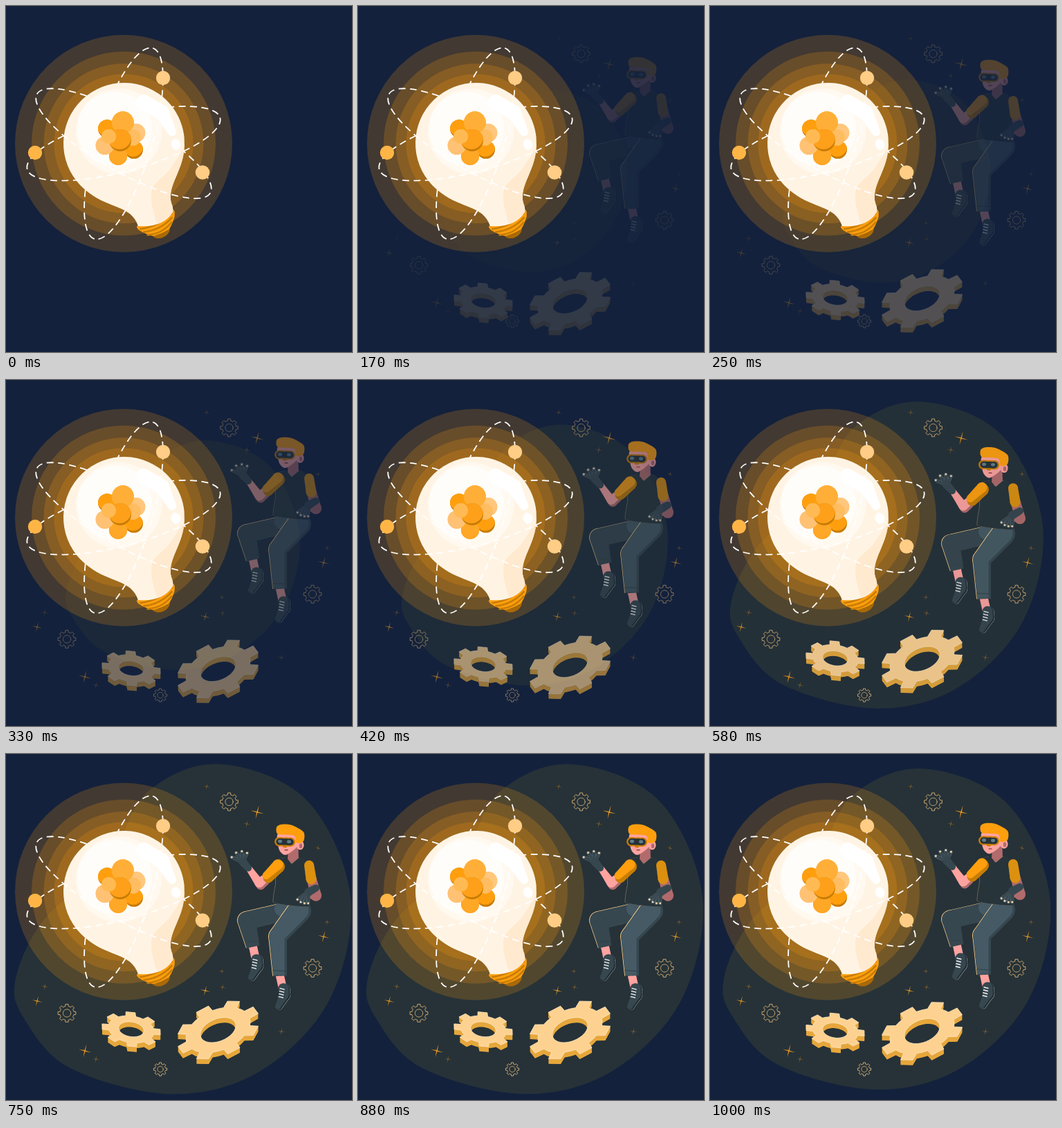
An HTML page with a canvas for the animation above (1.04 s loop, 500 px wide and 500 px high).

```html
<!DOCTYPE html>
<html lang="en">
<head>
<meta charset="utf-8">
<title>Bright idea</title>
<style>
html, body { margin: 0; width: 100%; height: 100%; overflow: hidden; background: #13213c; }
canvas { display: block; width: 100vw; height: 100vh; }
</style>
</head>
<body>
<canvas id="stage" width="500" height="500"></canvas>
<script>
const LOOP = 1040, RUN = 1000, LEAD = 20, TAU = Math.PI * 2, DEG = TAU / 360;
const ORANGE = '#ff9f0e', DULL = '#dc900f', AMBER = '#c97d04', CREAM = '#ffd08a', INK = '#263238';
const SKIN = '#ffa3a0', SKIN_DARK = '#b16b6c', GLOVE = '#37474f', EDGE = '#64747d';
const JEANS = '#455a64', JEANS_DARK = '#37474f';

const main = document.getElementById('stage').getContext('2d');
const sheet = document.createElement('canvas');
sheet.width = sheet.height = 500;
const layer = sheet.getContext('2d');
let c = main;

// cubic-bezier(.36, -.01, .5, 1.38)
function ease(x) {
  const at = (u, a, b) => 3 * a * u * (1 - u) ** 2 + 3 * b * u * u * (1 - u) + u ** 3;
  let lo = 0, hi = 1;
  for (let i = 0; i < 24; i++) {
    const mid = (lo + hi) / 2;
    if (at(mid, .36, .5) < x) lo = mid; else hi = mid;
  }
  return at(lo, -.01, 1.38);
}

// Closed curve through points; k = 0 gives straight sides, k = 1 a smooth curve.
function shape(fill, p, k = .8) {
  const n = p.length, get = i => p[(i + n) % n];
  c.beginPath();
  c.moveTo(...p[0]);
  for (let i = 0; i < n; i++) {
    const [a, b, d, e] = [i - 1, i, i + 1, i + 2].map(get), s = k / 6;
    c.bezierCurveTo(b[0] + (d[0] - a[0]) * s, b[1] + (d[1] - a[1]) * s,
      d[0] - (e[0] - b[0]) * s, d[1] - (e[1] - b[1]) * s, ...d);
  }
  c.fillStyle = fill;
  c.fill();
}

function disc(fill, x, y, rx, ry = rx, turn = 0) {
  c.beginPath();
  c.ellipse(x, y, rx, ry, turn, 0, TAU);
  c.fillStyle = fill;
  c.fill();
}

// Tapered tube through joints [x, y, radius].
function limb(fill, joints, round = true) {
  joints.forEach(([x, y, r], i) => {
    const next = joints[i + 1];
    if (next || round) disc(fill, x, y, r);
    if (!next) return;
    const [x2, y2, r2] = next, a = Math.atan2(y2 - y, x2 - x) + Math.PI / 2;
    const cx = Math.cos(a), cy = Math.sin(a);
    shape(fill, [[x + cx * r, y + cy * r], [x2 + cx * r2, y2 + cy * r2],
      [x2 - cx * r2, y2 - cy * r2], [x - cx * r, y - cy * r]], 0);
  });
}

function shifted(dx, dy, draw) {
  c.save();
  c.translate(dx, dy);
  draw();
  c.restore();
}

function group(alpha, dy, draw) {
  layer.clearRect(0, 0, 500, 500);
  c = layer;
  c.lineCap = c.lineJoin = 'round';
  shifted(0, dy, draw);
  c = main;
  c.globalAlpha = alpha;
  c.drawImage(sheet, 0, 0);
  c.globalAlpha = 1;
}

function backdrop(size) {
  c.save();
  c.translate(255.5, 253);
  c.scale(size, size);
  c.translate(-255.5, -253);
  shape(INK, [[20, 325], [60, 240], [150, 158], [205, 61], [305, 21], [428, 70],
    [491, 205], [462, 352], [364, 453], [240, 485], [98, 449], [33, 380]], 1);
  c.restore();
}

// Eight-toothed wheel on the plane spanned by u and v.
function wheel(x, y, u, v, root = .78) {
  const put = (r, a) => [x + r * (u[0] * Math.cos(a) + v[0] * Math.sin(a)),
    y + r * (u[1] * Math.cos(a) + v[1] * Math.sin(a))];
  c.beginPath();
  for (let i = 0; i < 8; i++) {
    for (const [r, d] of [[root, -.22], [1, -.16], [1, .16], [root, .22], [root, .39]]) {
      c.lineTo(...put(r, i * TAU / 8 + d));
    }
  }
  c.closePath();
  c.moveTo(...put(.43, 0));
  for (let i = 1; i <= 40; i++) c.lineTo(...put(.43, -i * TAU / 40));
  c.closePath();
}

function solidGear(x, y, u, v) {
  for (let d = 7.5; d >= 0; d -= .5) {
    wheel(x, y + d, u, v);
    c.fillStyle = d ? '#e6a73c' : '#fdd291';
    c.fill('evenodd');
  }
  c.strokeStyle = '#ffe6c0';
  c.lineWidth = .8;
  c.stroke();
}

function gears() {
  solidGear(181, 399.5, [42.5, 4], [1, 25]);
  solidGear(306.5, 400.5, [55, -29], [23, 30.5]);
}

function sparkle(x, y, r) {
  c.beginPath();
  for (let i = 0; i < 8; i++) {
    const a = i * TAU / 8 + .25, q = i % 2 ? r * .11 : r;
    c.lineTo(x + Math.sin(a) * q, y - Math.cos(a) * q);
  }
  c.fillStyle = r > 7 ? '#e8951b' : '#9b6c2a';
  c.fill();
}

function sky() {
  [[363, 84, 10], [459, 264, 8.5], [114, 429, 9.5], [45, 357, 7.5], [288, 342, 7.5],
    [290, 47, 4.5], [348, 101, 5.5], [313, 337, 5], [312, 314, 4.5], [451, 136, 4.5],
    [464, 243, 4.5], [398, 401, 5.5], [56, 336, 5.5], [130, 441, 5.5]].forEach(s => sparkle(...s));
  [[322.5, 69, 13], [88, 374.5, 13], [443, 309.5, 13], [223, 455.5, 9.7]].forEach(([x, y, r]) => {
    wheel(x, y, [r, 0], [0, r]);
    c.strokeStyle = '#dfb577';
    c.lineWidth = .9;
    c.stroke();
  });
}

function shoe(x, y) {
  const body = [[x, y, 7.5], [x + 1, y + 9, 7], [x - 8, y + 26, 4]];
  shifted(2.2, 1.2, () => limb('#839097', body));
  shifted(1.6, .8, () => limb('#1d272d', body));
  limb(GLOVE, body);
  for (let i = 0; i < 4; i++) {
    const lx = x - 5 - i * .6, ly = y + i * 4;
    limb('#f3f3f3', [[lx, ly, .7], [lx + 6, ly + 1.6, .7]]);
  }
}

function leg(fill, joints) {
  const [x, y] = joints[2];
  limb(SKIN, [[x, y, 6], [x + 3, y + 14, 6]]);
  shoe(x + 5, y + 18);
  shifted(-.9, -.4, () => limb(CREAM, joints, false));
  limb(JEANS_DARK, joints, false);
  shifted(-1.5, -1, () => limb(fill, joints.map(([a, b, r]) => [a, b, r - 2]), false));
  limb('#2f414a', [[x - 9, y - 8, .5], [x + 9, y - 7, .5]]);
}

// Glove with four fingers fanned out from the palm.
function hand(x, y, wrist, angle, step, reach) {
  for (let i = 0; i < 4; i++) {
    const a = angle + i * step, r = reach - i;
    const tx = x + Math.cos(a) * r, ty = y + Math.sin(a) * r;
    limb(EDGE, [[x, y, 3], [tx, ty, 2.3]]);
    limb(GLOVE, [[x, y, 3], [tx, ty, 1.7]]);
    disc('#ffe0b5', tx, ty, 1.4);
  }
  limb(GLOVE, [[x, y, 6], [...wrist, 5]]);
}

function raisedArm() {
  const arm = [[373, 179, 6], [366, 185, 6.5], [352, 165, 4.5]];
  shifted(2, 3, () => limb(SKIN_DARK, arm));
  limb(SKIN, arm);
  limb(AMBER, [[394, 161, 9], [379, 177, 7.5]]);
  limb(ORANGE, [[393, 158, 7.5], [376, 174, 5.5]]);
  hand(342, 154, [350, 163], -2.75, .55, 17);
}

function restingArm() {
  limb(SKIN_DARK, [[442, 180, 7], [448, 203, 8], [441, 201, 6]]);
  limb(DULL, [[438, 159, 7], [441, 179, 7.5]]);
  hand(437, 198, [448, 192], 2.55, -.32, 19);
}

function head() {
  limb(SKIN_DARK, [[415, 138, 7.5], [415, 151, 8]]);
  disc(SKIN, 425, 130, 5.5, 6.8);
  disc(SKIN_DARK, 426, 131, 2.3, 3.5);
  shape(SKIN, [[394, 113], [418, 112], [421, 131], [405, 144], [396, 139], [392, 125]]);
  shape(ORANGE, [[391, 104], [398, 100], [413, 101], [430, 111], [430, 124], [420, 127], [416, 116], [393, 114]]);
  limb(AMBER, [[394.5, 125, 6.5], [411.5, 125.5, 6.5]]);
  limb(INK, [[395, 125, 4.6], [411, 125.5, 4.6]]);
  disc('#607d8b', 396, 124.5, 3, 2.4);
  disc('#607d8b', 409, 125, 3, 2.4);
  disc(AMBER, 403, 132, 3, 1.5);
  limb('#7c3034', [[403, 137, .6], [407, 137, .6]]);
}

function person() {
  leg(JEANS_DARK, [[405, 226, 13], [348, 239, 13], [357, 277, 9.5]]);
  limb(JEANS, [[399, 222, 11], [429, 224, 11]]);
  leg(JEANS, [[424, 225, 17], [393, 262, 13], [396, 319, 10]]);
  head();
  const torso = [[391, 152], [405, 148], [413, 157], [424, 148], [433, 153], [438, 218], [387, 213], [390, 185]];
  shifted(-.7, 0, () => shape('#7e7460', torso, .3));
  shape('#27343a', torso, .3);
  raisedArm();
  restingArm();
}

function orbit(tilt, front) {
  c.beginPath();
  c.ellipse(170, 198.7, 144.2, 40, tilt * DEG, front ? 0 : Math.PI, front ? Math.PI : TAU);
  c.strokeStyle = '#fff';
  c.lineWidth = 1.8;
  c.setLineDash([10, 6.5]);
  c.stroke();
  c.setLineDash([]);
}

function cap() {
  c.save();
  c.translate(216, 308);
  c.rotate(-.41);
  disc('#a96a07', 0, 17, 14.5, 11.5);
  shape(ORANGE, [[-27, -2], [27, -3], [26.5, 8], [12, 21], [-12, 21], [-26, 8]], .6);
  for (let i = 0; i < 3; i++) {
    const w = 26.5 - i * 3, y = 4 + i * 6;
    c.beginPath();
    c.moveTo(-w, y);
    c.quadraticCurveTo(0, y + 8, w, y - 3);
    c.strokeStyle = AMBER;
    c.lineWidth = 2.8;
    c.stroke();
  }
  c.restore();
}

function bulb() {
  cap();
  c.save();
  c.beginPath();
  c.arc(170.5, 198.5, 87.5, 125 * DEG, 371 * DEG);
  c.bezierCurveTo(251, 244, 233, 262, 239, 285);
  c.quadraticCurveTo(242, 292, 241, 298);
  c.quadraticCurveTo(226, 321, 191, 318);
  c.bezierCurveTo(181, 288, 150, 293, 120, 270);
  c.closePath();
  c.fillStyle = '#fff4e4';
  c.fill();
  c.clip();
  shape('#ffead0', [[262, 205], [236, 237], [212, 262], [211, 288], [224, 322], [252, 300]]);
  disc('#fff9f0', 163, 181, 62);
  disc('#fffdf9', 157, 178, 54);
  c.restore();
  limb('#fff', [[199, 139, 11], [225, 154, 11], [240, 182, 6]]);
  disc('#fff', 245.5, 200, 6.5, 8, -.3);
}

function ball(x, y, r, fill, shade = fill) {
  disc(shade, x, y, r);
  c.save();
  c.clip();
  disc(fill, x - 1, y - (shade === fill ? 0 : 4), r + 1);
  c.restore();
}

function nucleus() {
  const tint = [ORANGE, '#ffaf38', '#ffc77c', ORANGE, '#ffa726', '#ffc274'];
  for (let n = 2; n < 8; n++) {
    const i = n % 6, a = (i * 60 - 142) * DEG;
    ball(165.5 + 24.5 * Math.cos(a), 192.5 + 24.5 * Math.sin(a), i === 1 ? 16 : 13.2,
      tint[i], i % 3 ? tint[i] : AMBER);
    if (i === 3) ball(183.5, 190, 11.5, '#ffbd61');
  }
  ball(165, 194, 16, '#ffa01a', AMBER);
  ball(148.5, 188.5, 10.5, '#ffba54');
}

function lamp() {
  [157, 133, 115.5, 100.5].forEach(r => disc('rgba(255,156,10,.2)', 170, 198.7, r));
  const tilts = [-15, 29.7, -73];
  tilts.forEach(a => orbit(a, false));
  bulb();
  tilts.forEach(a => orbit(a, true));
  nucleus();
  disc('#ffcd85', 227, 104, 10.2);
  disc('#ffb546', 42, 212, 10.2);
  disc('#ffcd85', 284, 240.5, 10.3);
}

function frame(now) {
  const e = ease(Math.min(1, (now % LOOP + LEAD) / RUN));
  const alpha = Math.max(0, Math.min(1, e));
  c.fillStyle = '#13213c';
  c.fillRect(0, 0, 500, 500);
  group(alpha, 0, () => backdrop(.5 + .5 * e));
  group(alpha, 0, sky);
  group(alpha, 30 * (1 - e), gears);
  group(alpha, -30 * (1 - e), person);
  lamp();
}

const start = performance.now();
function tick() {
  frame(performance.now() - start);
  requestAnimationFrame(tick);
}
tick();
</script>
</body>
</html>
```
